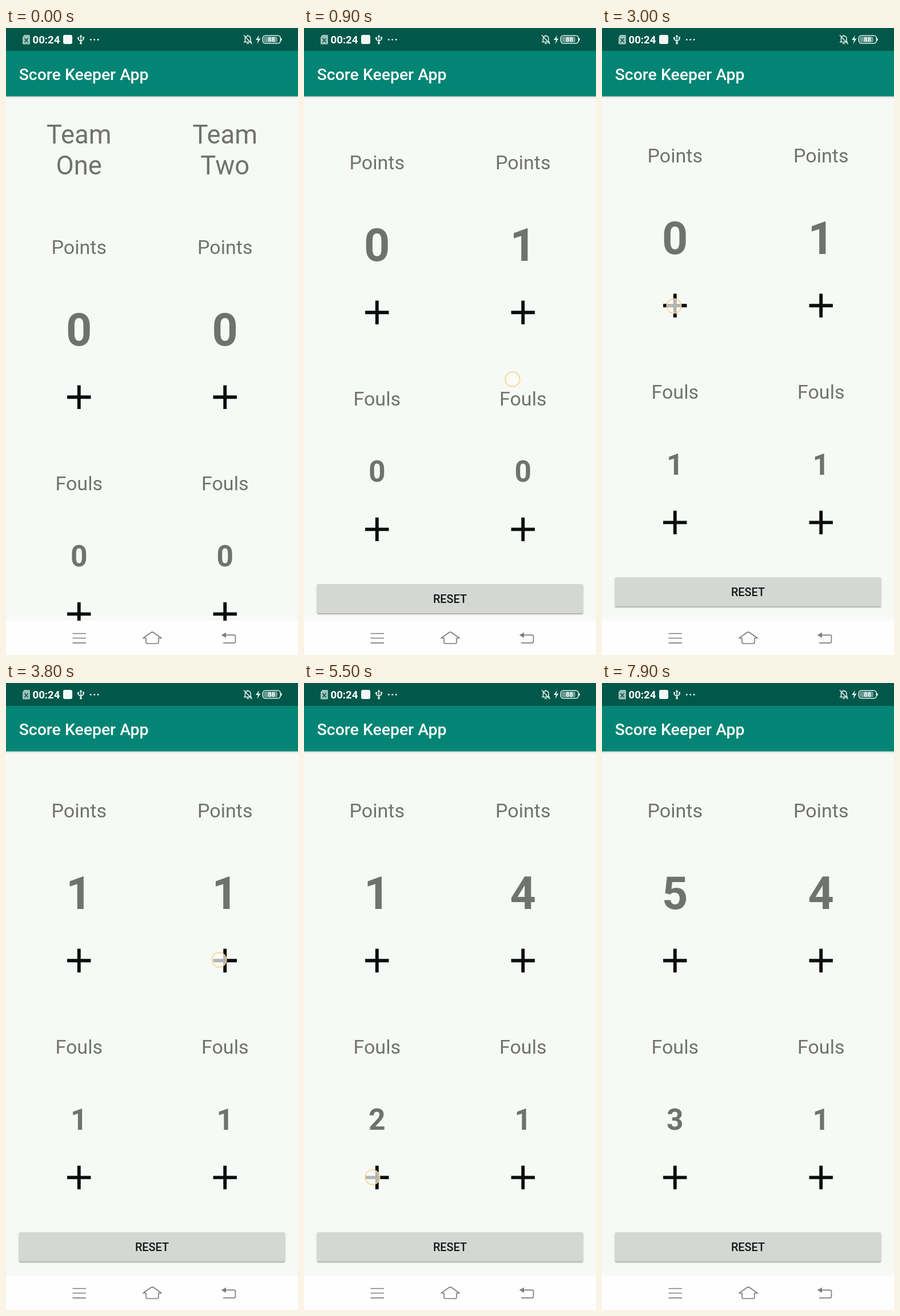
Animation of 511x1096 px, one loop 8000 ms. Source, as an HTML page:

```html
<!DOCTYPE html>
<html lang="en">
<head>
<meta charset="utf-8">
<title>Score Keeper App</title>
<style>
  html, body { margin: 0; width: 100%; height: 100%; overflow: hidden; background: #f7f9f6; }
  svg { display: block; width: 100%; height: 100%; font-family: Roboto, sans-serif; }
  .mid { text-anchor: middle; fill: #70726f; }
  .team { font-size: 45.4px; }
  .label { font-size: 34.06px; }
  .points { font-size: 79px; font-weight: 700; }
  .fouls { font-size: 51.5px; font-weight: 700; }
  .plus { stroke: #0b0e0d; stroke-width: 5.9; }
  .line { fill: none; stroke: #7c7e7d; stroke-width: 1.7; }
  .icon { fill: none; stroke: #e4f0ed; stroke-width: 1.6; }
</style>
</head>
<body>
<svg viewBox="0 0 511 1096">
  <defs>
    <linearGradient id="shade" x2="0" y2="1">
      <stop stop-color="#000" stop-opacity=".13"/>
      <stop offset="1" stop-color="#000" stop-opacity="0"/>
    </linearGradient>
    <filter id="drop" x="-5%" y="-20%" width="110%" height="150%">
      <feDropShadow dx="0" dy="1.6" stdDeviation="1.3" flood-opacity=".38"/>
    </filter>
  </defs>
  <rect width="511" height="1096" fill="#f7f9f6"/>

  <g id="page">
    <g id="columns"></g>
    <rect x="22.7" y="1120" width="465.6" height="51" rx="2.5" fill="#d5d7d4" filter="url(#drop)"/>
    <text x="255.5" y="1153" text-anchor="middle" font-size="19.87" font-weight="500" fill="#151817">RESET</text>
  </g>

  <rect y="119" width="511" height="5" fill="url(#shade)"/>
  <rect y="39" width="511" height="80.5" fill="#028574"/>
  <rect width="511" height="40" fill="#015749"/>
  <text x="22.7" y="91" font-size="28.4" font-weight="500" fill="#fff">Score Keeper App</text>

  <!-- status bar -->
  <path d="M32 12H40.500Q42 12 42 13.500V27Q42 28.500 40.500 28.500H30.500Q29 28.500 29 27V16Z" fill="#9cc0b8"/>
  <path d="M32.500 18L38.500 25M38.500 18L32.500 25" stroke="#015749" stroke-width="1.6"/>
  <text x="46.500" y="26.800" font-size="18.600" font-weight="700" fill="#fff">00:24</text>
  <rect x="100" y="12" width="16" height="16" rx="3" fill="#f2f8f6"/>
  <path class="icon" d="M131 14V26M126.500 17.500V20L131 23.500L135.500 20V17"/>
  <path d="M131 11.500L133.500 15.500H128.500ZM125 16H128V19H125ZM134 15.500H137V18.500H134Z" fill="#e4f0ed"/>
  <g fill="#e4f0ed">
    <circle cx="131" cy="26.500" r="2"/>
    <circle cx="148.300" cy="20.300" r="1.500"/>
    <circle cx="154.700" cy="20.300" r="1.500"/>
    <circle cx="161.100" cy="20.300" r="1.500"/>
    <path d="M443 12.500L437 21H441L439.500 28L445.500 18.500H441.500Z"/>
    <rect x="451" y="15" width="24" height="10" rx="2.500" fill-opacity=".45"/>
    <path d="M481 17.500Q483 18 483 20T481 22.500Z"/>
  </g>
  <path class="icon" d="M416 24.500H430M418.500 24V18.500Q418.500 14 423.200 14T428 18.500V24M421 27H425.500M423.200 12V14M416 12.500L430.500 28"/>
  <rect class="icon" x="449.300" y="13.200" width="31" height="13.600" rx="4.500"/>
  <text x="464.500" y="24.300" text-anchor="middle" font-size="11.500" font-weight="700" fill="#fff">88</text>

  <!-- navigation bar -->
  <rect y="1036" width="511" height="60" fill="#fefefe"/>
  <path class="line" d="M116.500 1058.500H140M116.500 1066.500H140M116.500 1074.800H140"/>
  <path class="line" stroke-linejoin="round" d="M240 1066.500L254 1056.500Q256 1055.300 258 1056.500L272 1066.500H267V1073.500Q267 1076 264.500 1076H247.500Q245 1076 245 1073.500V1066.500Z"/>
  <path class="line" d="M384 1061.200H399Q401.500 1061.200 401.500 1063.700V1072.300Q401.500 1074.800 399 1074.800H380"/>
  <path d="M376.800 1061.200L385 1056.500V1066Z" fill="#7c7e7d"/>

  <circle id="touch" r="12.700" fill="#fbfcfa" fill-opacity=".7" stroke="#f4d27e" stroke-width="1.600"/>
</svg>

<script>
const LOOP = 8000, STEP = 100;
const byId = id => document.getElementById(id);

const plus = (x, y) => `<path class="plus" d="M${x - 20.7} ${y}h41.400M${x} ${y - 20.7}v41.400"/>`;
const text = (kind, x, y, value) => `<text class="mid ${kind}" x="${x}" y="${y}">${value}</text>`;

byId("columns").innerHTML = ["One", "Two"].map((name, i) => {
  const x = 127.75 + 255.5 * i;
  return text("team", x, 202.3, "Team") + text("team", x, 255.6, name)
    + text("label", x, 395, "Points") + text("points", x, 555, 0) + plus(x, 645.2)
    + text("label", x, 808.3, "Fouls") + text("fouls", x, 940.8, 0) + plus(x, 1024.4);
}).join("");

// Counters in page order: points one, fouls one, points two, fouls two
const counters = document.querySelectorAll(".points, .fouls");
const [P1, F1, P2, F2] = [0, 1, 2, 3];

// [counter, finger down, count goes up, finger lifted, x, y]
const taps = [
  [P2, 100, 100, 200, 383, 645],
  [F1, 1600, 1700, 1900, 126, 864],
  [F2, 2200, 2300, 2400, 390, 873],
  [P1, 3000, 3100, 3300, 126, 486],
  [P2, 3800, 3900, 3900, 373, 484],
  [P2, 4000, 4100, 4100, 373, 484],
  [P2, 4200, 4300, 4400, 373, 484],
  [F1, 5500, 5500, 5700, 120, 864],
  [F1, 5800, 5900, 6000, 120, 864],
  ...[6800, 7100, 7400, 7700].map(t => [P1, t, t + 100, t + 200, 127.5, 502])
];

// Scroll offset for each step of the swipe that starts at 700 ms
const SWIPE = 700, offsets = [16, 88, 148, 160];

function draw(now) {
  const t = Math.floor(now % LOOP / STEP) * STEP;
  const swipeStep = (t - SWIPE) / STEP;
  const scroll = t < SWIPE ? 0 : offsets[Math.min(swipeStep, 3)];
  byId("page").setAttribute("transform", `translate(0 ${-scroll})`);

  const counts = [0, 0, 0, 0];
  let finger = swipeStep >= 0 && swipeStep < 3 ? [365, 762 - scroll] : null;
  for (const [counter, down, up, lifted, x, y] of taps) {
    if (t >= up) counts[counter]++;
    if (t >= down && t < lifted) finger = [x, y];
  }
  counters.forEach((el, i) => el.textContent = counts[i]);

  const touch = byId("touch");
  touch.style.display = finger ? "" : "none";
  if (finger) touch.setAttribute("transform", `translate(${finger})`);
}

const start = performance.now();
function tick() {
  draw(performance.now() - start);
  requestAnimationFrame(tick);
}
tick();
</script>
</body>
</html>
```
